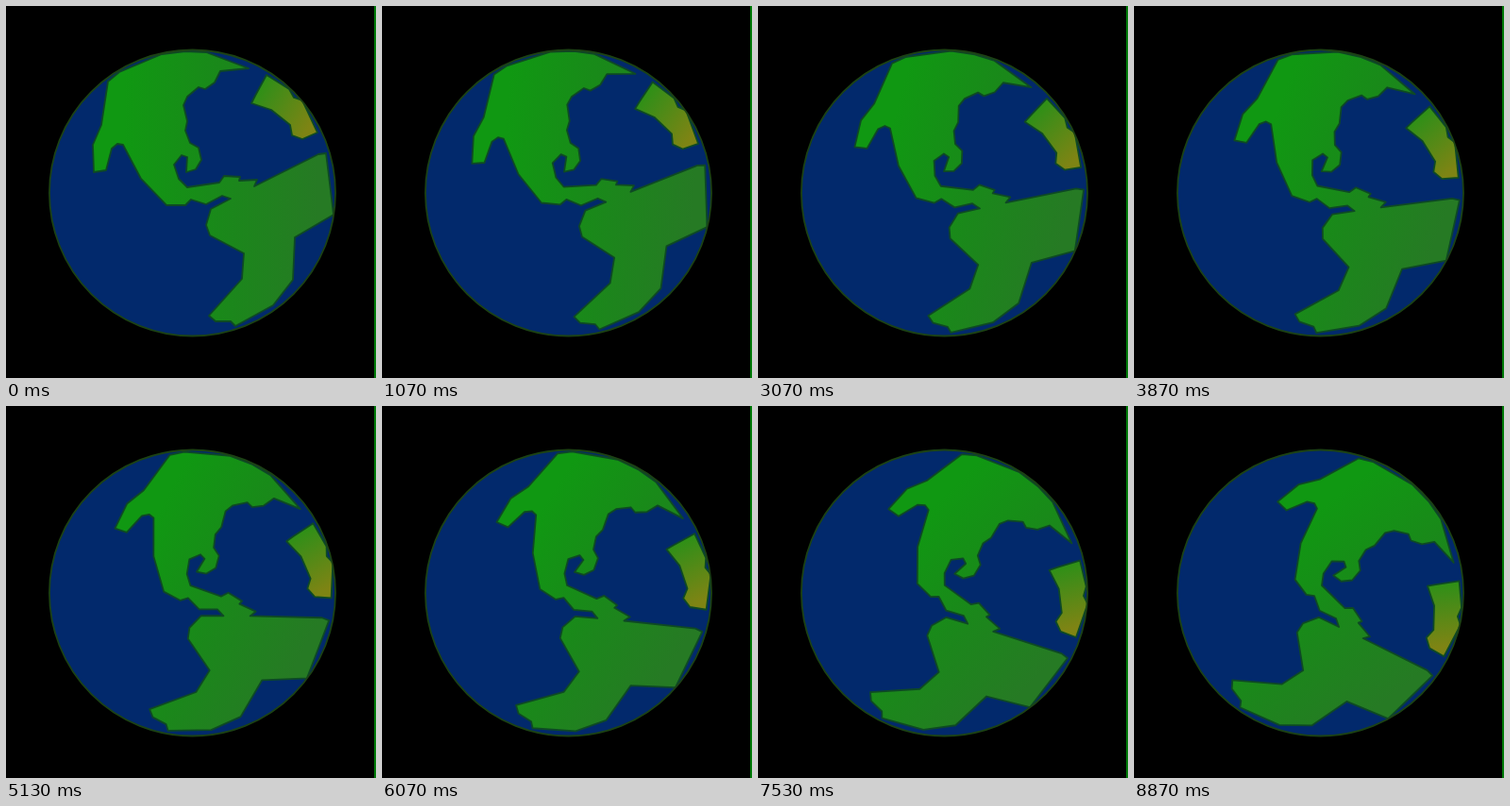
An HTML page for the animation above (8940 ms loop, 392 px wide and 394 px high).

```html
<!DOCTYPE html>
<html lang="en">
<head>
<meta charset="utf-8">
<title>Turning globe</title>
<style>
  html, body { margin: 0; width: 100%; height: 100%; overflow: hidden; background: #000; }
  svg { display: block; }
</style>
</head>
<body>
<svg width="392" height="394">
  <defs>
    <linearGradient id="green" gradientUnits="userSpaceOnUse" x1="125" x2="330">
      <stop stop-color="#109812"/>
      <stop offset=".5" stop-color="#1a881a"/>
      <stop offset="1" stop-color="#267a24"/>
    </linearGradient>
    <linearGradient id="olive" x2="1" y2=".6">
      <stop stop-color="#1c9414"/>
      <stop offset=".35" stop-color="#3f8c18"/>
      <stop offset="1" stop-color="#7e8414"/>
    </linearGradient>
    <clipPath id="disc"><circle id="globe" cx="197.5" cy="198" r="151.5"/></clipPath>
  </defs>
  <rect x="390" width="2" height="394" fill="#007a08"/>
  <use href="#globe" fill="#02296c"/>
  <g clip-path="url(#disc)">
    <g id="land" stroke="#0e4a24" stroke-width="1.8" stroke-linejoin="round">
      <path fill="url(#green)" d="M93 176 92 147 101 126 108 80 120 70 165 51 190 48 212 49 257 66
        227 69 221 81 211 88 204 86 192 96 188 105 192 122 190 132 195 145 204 150 207 163 201 173
        191 176 192 160 186 158 178 168 183 183 192 192 226 187 231 180 248 181 247 185 266 184 263 191
        331 157 339 156 342 180 347 221 306 245 304 290 283 317 243 339 238 334 222 334 215 328
        250 289 252 262 216 243 212 232 217 215 238 204 229 201 212 210 196 205 190 211 170 211
        143 183 124 147 118 146 112 151 106 174Z"/>
      <path fill="url(#olive)" d="M276 73 300 88 305 97 314 100 330 134 314 141 303 137 301 126
        281 110 260 103 264 95Z"/>
    </g>
  </g>
  <use href="#globe" fill="none" stroke="#1c4214" stroke-width="1.8"/>
</svg>
<script>
  const LOOP = 8940;
  // [time in ms, angle in degrees]: the globe turns at a slightly uneven pace
  const turns = [[0, 0], [2070, 9.8], [3870, 19.5], [5130, 27.9], [6070, 32.7], [7530, 44.4], [LOOP, 53.4]];
  const land = document.getElementById('land');

  function angleAt(t) {
    const i = turns.findIndex(([time]) => time > t);
    const [t0, a0] = turns[i - 1], [t1, a1] = turns[i];
    return a0 + (a1 - a0) * (t - t0) / (t1 - t0);
  }

  function draw() {
    const angle = angleAt(performance.now() % LOOP);
    land.setAttribute('transform', `rotate(${angle} 197.5 198)`);
    requestAnimationFrame(draw);
  }
  draw();
</script>
</body>
</html>
```
